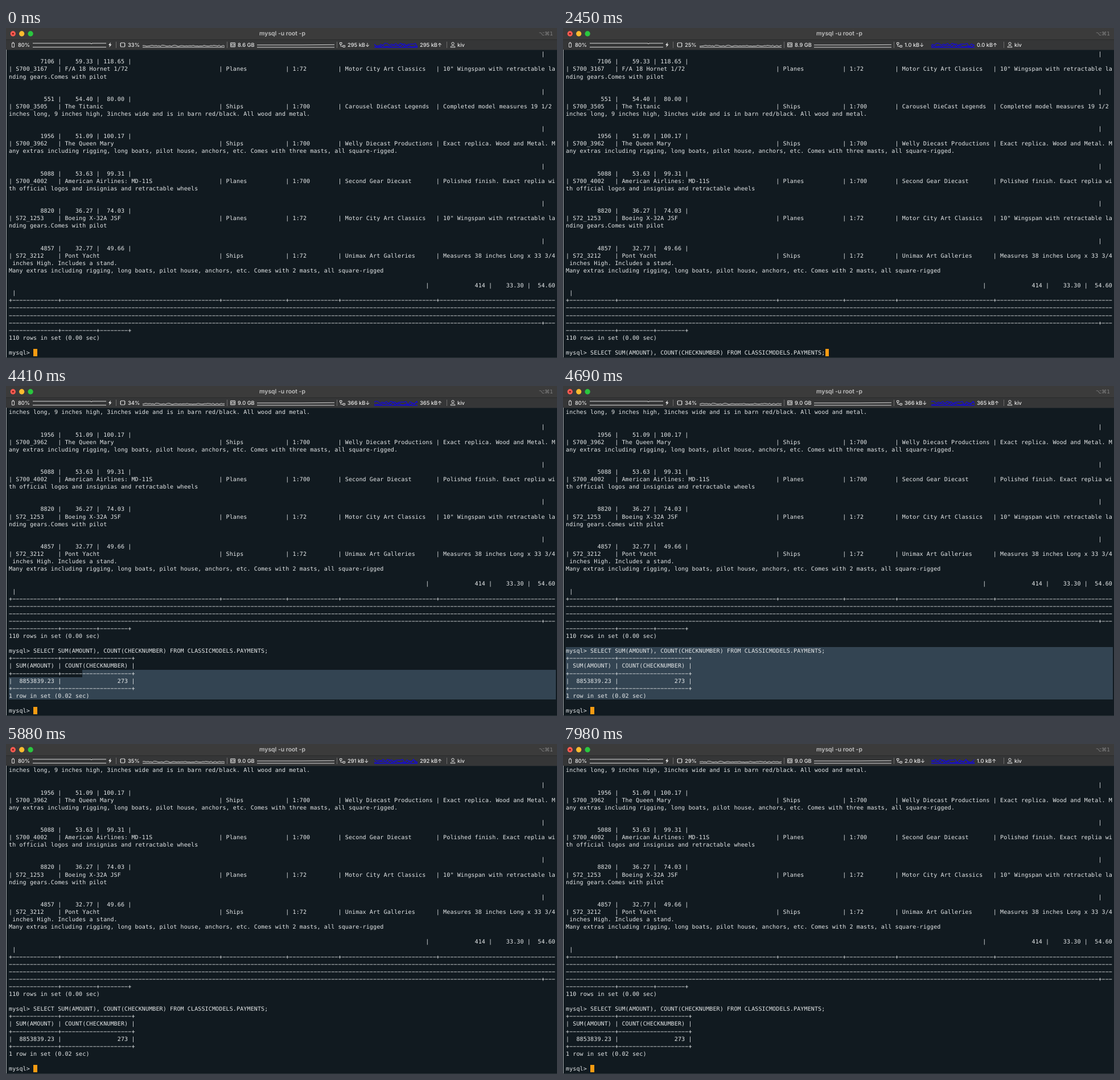
These frames come from a looping animation (968 by 579 pixels, 8000 ms). An HTML page:

```html
<!DOCTYPE html>
<html lang="en">
<head>
<meta charset="utf-8">
<title>Terminal</title>
<style>
html, body { margin: 0; width: 968px; height: 579px; overflow: hidden; background: #111a20; }
body { position: relative; }
svg, pre, .mark, #cursor { position: absolute; }
svg { left: 0; top: 0; }
pre {
  left: 5px; top: 40.25px; margin: 0;
  font: 10.01px/13.09px "DejaVu Sans Mono", monospace;
  letter-spacing: .1335px;
  font-variant-ligatures: none;
  text-rendering: geometricPrecision;
  color: #e6e9ea;
}
.mark { background: #334452; }
#cursor { width: 6.6px; height: 13px; background: #f79b12; }
.title { font: 600 10.4px Inter, sans-serif; fill: #c3c3c3; text-anchor: middle; }
.keys { font: 9px "DejaVu Sans", sans-serif; fill: #868686; text-anchor: end; }
.status text { font: 500 9.3px Inter, sans-serif; fill: #ececec; }
.status path { fill: none; stroke: #dcdcdc; stroke-width: 1; }
.status .rule { stroke: #6c6c6c; }
.status .solid { fill: #e4e4e4; stroke: none; }
.status .net { stroke: #160bd0; stroke-width: 1.3; }
</style>
</head>
<body>
<div class="mark" id="markTop"></div>
<div class="mark" id="markRest"></div>
<pre id="screen"></pre>
<div id="cursor"></div>

<svg width="968" height="579" viewBox="0 0 968 579" text-rendering="geometricPrecision">
  <defs>
    <clipPath id="cpuClip"><path d="M240 23H384V36H240Z"/></clipPath>
    <clipPath id="netClip"><path d="M647 23H723V36H647Z"/></clipPath>
  </defs>
  <path d="M0 0H968V20H0Z" fill="#3b3b3b"/>
  <path d="M0 20H968V38.5H0Z" fill="#353637"/>
  <path d="M0 20.5H968" stroke="#2a2a2b"/>
  <path d="M.5 38V579" stroke="#a4a8aa"/>
  <path d="M0 578.5H968" stroke="#2b3338"/>
  <circle cx="12.3" cy="10" r="4.65" fill="#fb5b51"/>
  <circle cx="12.3" cy="10" r="1.6" fill="#7c1712"/>
  <circle cx="27.7" cy="10" r="4.65" fill="#fcbb2f"/>
  <circle cx="43.1" cy="10" r="4.65" fill="#2ac73f"/>
  <text class="title" x="485.5" y="13.2">mysql -u root -p</text>
  <text class="keys" x="961" y="12.5">⌥⌘1</text>

  <g class="status">
    <path class="rule" d="M193.5 24V35M388.5 24V35M581.5 24V35M774.5 24V35"/>
    <path d="M10.5 26.5H14.5V33.5H10.5ZM11.5 25.2H13.5"/>
    <text x="21" y="33">80%</text>
    <path d="M47 26.8H149V27.5H151V26.8H176M47 33.6H176"/>
    <path class="solid" d="M184 25L180 30H182.3L181.2 34L185.6 28.8H183.2Z"/>

    <path stroke-width="1.4" d="M201.5 26H208.5V33H201.5Z"/>
    <path d="M200 28H201M200 31H201M209 28H210M209 31H210"/>
    <text id="cpu" x="214" y="33"></text>
    <path d="M240 33.8H384"/>
    <path id="cpuLine" clip-path="url(#cpuClip)"/>

    <path d="M394.5 26H402.5V33H394.5ZM397 26V33M400 26V33M395 29.5H397M400 29.5H402"/>
    <text id="memory" x="407" y="33"></text>
    <path d="M441 29.8H520L577 29.3M441 33.8H577"/>

    <path d="M586.5 25.5H590V28.5H586.5ZM592 30.5H595.5V33.5H592ZM588 28.5V32H592"/>
    <text id="down" x="600" y="33"></text>
    <path class="net" d="M647 34H723"/>
    <path class="net" id="downLine" clip-path="url(#netClip)"/>
    <path class="net" id="upLine" clip-path="url(#netClip)"/>
    <text id="up" x="727" y="33"></text>

    <circle cx="785" cy="27.3" r="2.2" fill="none" stroke="#dcdcdc"/>
    <path d="M781 33.8C781 30 789 30 789 33.8Z"/>
    <text x="793" y="33">kiv</text>
  </g>
</svg>

<script>
const LOOP = 8000, TICK = 70;
const LEFT = 5, TOP = 39.6, CELL = 6.16, ROW = 13.09, COLS = 156, VISIBLE = 41;
const TYPE_START = 70, TYPE_TIME = 2310, ENTER = 2520;
const DRAG_START = 4270, DRAG_TIME = 350, DESELECT = 5810;

const $ = id => document.getElementById(id);
const clamp = v => Math.min(1, Math.max(0, v));

// Builds a line from (column, text) pairs.
function line(...cells) {
  let out = '';
  for (let i = 0; i < cells.length; i += 2) out = out.padEnd(cells[i]) + cells[i + 1];
  return out;
}
const product = (code, name, kind, scale, vendor, about) =>
  line(0, '| ' + code, 14, '| ' + name, 60, '| ' + kind, 79, '| ' + scale,
       94, '| ' + vendor, 122, '| ' + about);
const figures = (stock, price, msrp) =>
  `${stock.padStart(13)} |${price.padStart(9)} |${msrp.padStart(7)} |`;
// The minus sign nearly fills its cell, so borders read as lines.
const dashes = (...runs) => runs.map(n => '\u2212'.repeat(n)).join('+');

const bar = line(152, '|');
const query = 'SELECT SUM(AMOUNT), COUNT(CHECKNUMBER) FROM CLASSICMODELS.PAYMENTS;';
const prompt = 'mysql> ';
const edge = dashes(0, 13, 20, 0);

const history = [
  bar,
  figures('7106', '59.33', '118.65'),
  product('S700_3167', 'F/A 18 Hornet 1/72', 'Planes', '1:72', 'Motor City Art Classics', '10" Wingspan with retractable la'),
  'nding gears.Comes with pilot',
  '', bar,
  figures('551', '54.40', '80.00'),
  product('S700_3505', 'The Titanic', 'Ships', '1:700', 'Carousel DieCast Legends', 'Completed model measures 19 1/2 '),
  'inches long, 9 inches high, 3inches wide and is in barn red/black. All wood and metal.',
  '', bar,
  figures('1956', '51.09', '100.17'),
  product('S700_3962', 'The Queen Mary', 'Ships', '1:700', 'Welly Diecast Productions', 'Exact replica. Wood and Metal. M'),
  'any extras including rigging, long boats, pilot house, anchors, etc. Comes with three masts, all square-rigged.',
  '', bar,
  figures('5088', '53.63', '99.31'),
  product('S700_4002', 'American Airlines: MD-11S', 'Planes', '1:700', 'Second Gear Diecast', 'Polished finish. Exact replia wi'),
  'th official logos and insignias and retractable wheels',
  '', bar,
  figures('8820', '36.27', '74.03'),
  product('S72_1253', 'Boeing X-32A JSF', 'Planes', '1:72', 'Motor City Art Classics', '10" Wingspan with retractable la'),
  'nding gears.Comes with pilot',
  '', bar,
  figures('4857', '32.77', '49.66'),
  product('S72_3212', 'Pont Yacht', 'Ships', '1:72', 'Unimax Art Galleries', 'Measures 38 inches Long x 33 3/4'),
  ' inches High. Includes a stand.',
  'Many extras including rigging, long boats, pilot house, anchors, etc. Comes with 2 masts, all square-rigged',
  '',
  line(119, '|', 133, '414 |', 142, '33.30 |', 151, '54.60'),
  ' |',
  dashes(0, 13, 45, 18, 14, 27, 33),
  dashes(COLS), dashes(COLS),
  dashes(152, 3),
  dashes(14, 10, 8, 0),
  '110 rows in set (0.00 sec)',
  ''
];
const result = [
  prompt + query,
  edge, '| SUM(AMOUNT) | COUNT(CHECKNUMBER) |',
  edge, line(0, '|  8853839.23 |', 31, '273 |'),
  edge, '1 row in set (0.02 sec)',
  ''
];

// One status reading per second: cpu %, memory GB, download, upload.
const readings = [
  [33, '8.6', '295', '295'],
  [30, '8.8', '2.0', '1.0'],
  [28, '8.9', '3.0', '2.0'],
  [25, '8.9', '1.0', '0.0'],
  [27, '8.9', '359', '361'],
  [34, '9.0', '366', '365'],
  [35, '9.0', '291', '292'],
  [33, '9.0', '291', '290'],
  [29, '9.0', '2.0', '1.0']
];

const noise = n => {
  const v = Math.sin(n * 12.9898) * 43758.5453;
  return v - Math.floor(v);
};

// Sparkline that slides left by one step per second.
function spark(id, seed, x, width, step, base, height, seconds) {
  const first = Math.floor(seconds), shift = seconds - first;
  let d = '';
  for (let i = 0; i <= width / step + 1; i++) {
    const y = base - height * noise(i + first + seed);
    d += `${i ? 'L' : 'M'}${(x + (i - shift) * step).toFixed(2)} ${y.toFixed(2)}`;
  }
  $(id).setAttribute('d', d);
}

function place(el, col, row, cols, rows) {
  el.style.left = LEFT + col * CELL + 'px';
  el.style.top = TOP + row * ROW + 'px';
  el.style.width = cols * CELL + 'px';
  el.style.height = rows * ROW + 'px';
}

function setText(el, text) {
  if (el.textContent !== text) el.textContent = text;
}

function drawTerminal(t) {
  const done = t >= ENTER;
  const typed = done ? 0 : Math.round(query.length * clamp((t - TYPE_START) / TYPE_TIME));
  const lines = [...history, ...(done ? result : []), prompt + query.slice(0, typed)];
  setText($('screen'), lines.slice(-VISIBLE).join('\n'));
  $('cursor').style.left = LEFT + (prompt.length + typed) * CELL + 'px';
  $('cursor').style.top = TOP + 40 * ROW + 'px';
}

// The selection is dragged upwards from the last result row.
function drawSelection(t) {
  const on = t >= DRAG_START && t < DESELECT;
  const p = clamp((t - DRAG_START) / DRAG_TIME);
  const row = Math.floor(38 - 6 * p), col = Math.round(35 * (1 - p));
  place($('markTop'), col, row, on ? COLS - col : 0, 1);
  place($('markRest'), 0, row + 1, on ? COLS : 0, 38 - row);
}

function drawStatus(t) {
  const [cpu, memory, down, up] = readings[Math.floor((t + 700) / 1000)];
  setText($('cpu'), cpu + '%');
  setText($('memory'), memory + ' GB');
  setText($('down'), down + ' kB↓');
  setText($('up'), up + ' kB↑');
  spark('cpuLine', 240, 240, 144, 2.4, 32.2, 2, t / 1000);
  spark('downLine', 31, 647, 76, 3.8, 34, 7.5, t / 1000);
  spark('upLine', 77, 647, 76, 3.8, 34, 7.5, t / 1000);
}

const start = performance.now();
function frame() {
  const now = (performance.now() - start) % LOOP;
  const t = Math.floor(now / TICK) * TICK;
  drawTerminal(t);
  drawSelection(t);
  drawStatus(t);
  requestAnimationFrame(frame);
}
frame();
</script>
</body>
</html>
```
